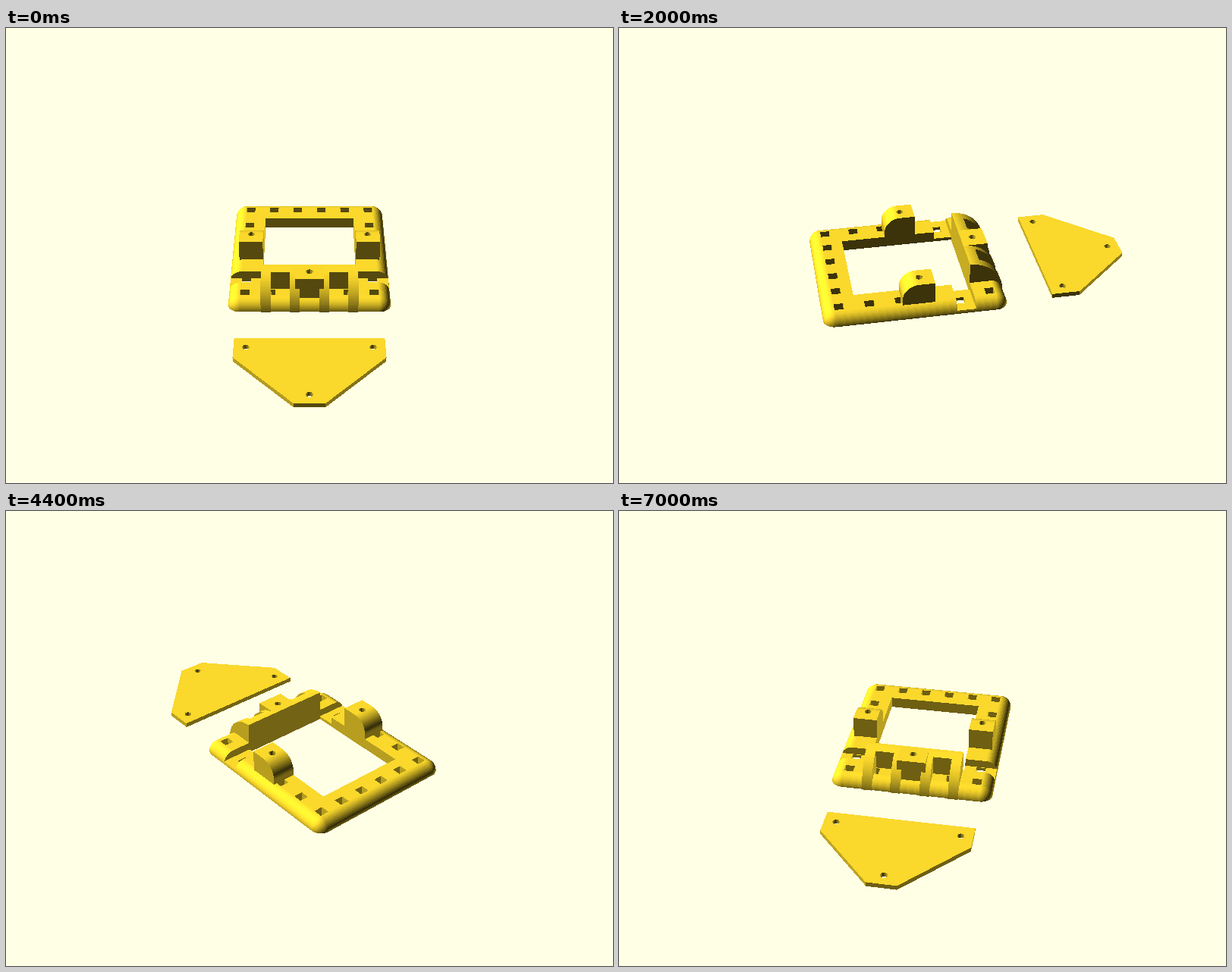
Recreate the animation shown at these times as an HTML page with a canvas. Size 800 px wide and 600 px high, loop 7200 ms.

```html
<!DOCTYPE html>
<html lang="en">
<head>
<meta charset="utf-8">
<title>Turntable</title>
<style>
  html, body { margin: 0; width: 100%; height: 100%; overflow: hidden; background: #ffffe5; }
  canvas { display: block; width: 800px; height: 600px; }
</style>
</head>
<body>
<canvas id="view" width="800" height="600"></canvas>
<script>
const W = 800, H = 600, STEPS = 36, STEP_MS = 200;
const RAD = Math.PI / 180;
const DIST = 500, FOCAL = 300 / Math.tan(11.25 * RAD);
const CT = Math.cos(55 * RAD), ST = Math.sin(55 * RAD);
const PIVOT_Z = 7.2;
const BASE = [249, 215, 44];

// ---- model ----
const HX = 29.3, Y0 = -25.9, Y1 = 42, RIM = 5;      // flat part of the frame and its rounded rim
const WIN_X = 20.3, WIN_Y = 33.1;                   // window
const GAP0 = -16.8, GAP1 = -8.9, GAP_Z = 1.5;       // thin bridge behind the hinge
const TOP = 14.4, PIN = 1.5;
const COLS = [-5, -3, -1, 1, 3, 5].map(k => k * 5.46);
const ROWS = [40, 27.2, 14.4, -11.2, -24];
const PINS = [[25.4, 6], [-25.4, 6], [0, -22], [25.4, -56.5], [-25.4, -56.5], [0, -84.5]];

const faces = [];

function face(...pts) {
  const n = [0, 0, 0];
  pts.forEach((p, i) => {
    const q = pts[(i + 1) % pts.length];
    for (let a = 0; a < 3; a++) {
      const b = (a + 1) % 3, c = (a + 2) % 3;
      n[a] += (p[b] - q[b]) * (p[c] + q[c]);
    }
  });
  const len = Math.hypot(...n);
  if (len > 1e-9) faces.push({ pts, n: n.map(v => v / len) });
}

// Extrudes a convex outline along axis 0, 1 or 2.
function prism(outline, axis, from, to) {
  const at = ([a, b], t) => axis === 0 ? [t, a, b] : axis === 1 ? [a, t, b] : [a, b, t];
  face(...outline.map(p => at(p, from)));
  face(...outline.map(p => at(p, to)));
  outline.forEach((p, i) => {
    const q = outline[(i + 1) % outline.length];
    face(at(p, from), at(q, from), at(q, to), at(p, to));
  });
}

function arc(cx, cy, rx, ry, a0, a1, n) {
  return Array.from({ length: n + 1 }, (_, i) => {
    const a = a0 + (a1 - a0) * i / n;
    return [cx + rx * Math.cos(a), cy + ry * Math.sin(a)];
  });
}

const near = (list, v) => list.some(c => Math.abs(c - v) < 2);

function solid(x, y, z) {
  if (Math.abs(x) > HX || y < Y0 || y > Y1 || z < 0 || z > RIM) return false;
  if (Math.abs(x) < WIN_X && y > GAP0 && y < WIN_Y) return false;
  if (y > GAP0 && y < GAP1 && z > GAP_Z) return false;
  return !(near(COLS, x) && near(ROWS, y));
}

function cuts(list, centres) {
  const all = list.concat(...centres.map(c => [c - 2, c + 2])).sort((a, b) => a - b);
  return all.filter((v, i) => !i || v - all[i - 1] > 1e-6);
}

// Block part of the frame: one face wherever solid meets air.
function blocks() {
  const g = [
    cuts([-HX, -WIN_X, WIN_X, HX], COLS),
    cuts([Y0, GAP0, GAP1, WIN_Y, Y1], ROWS),
    [0, GAP_Z, RIM]
  ];
  const mid = (a, i) => i < 0 || i > g[a].length - 2 ? 1e4 : (g[a][i] + g[a][i + 1]) / 2;
  const full = c => solid(mid(0, c[0]), mid(1, c[1]), mid(2, c[2]));
  for (let a = 0; a < 3; a++) {
    const b = (a + 1) % 3, c = (a + 2) % 3;
    for (let i = 0; i < g[a].length; i++)
      for (let j = 0; j < g[b].length - 1; j++)
        for (let k = 0; k < g[c].length - 1; k++) {
          const lo = [], hi = [];
          lo[a] = i - 1; hi[a] = i;
          lo[b] = hi[b] = j;
          lo[c] = hi[c] = k;
          if (full(lo) === full(hi)) continue;
          const corner = (u, v) => {
            const p = [];
            p[a] = g[a][i]; p[b] = g[b][j + u]; p[c] = g[c][k + v];
            return p;
          };
          face(corner(0, 0), corner(1, 0), corner(1, 1), corner(0, 1));
        }
  }
}

function rim() {
  const Q = Math.PI / 2, N = 12;
  const round = (edge, s) => [[edge, 0], ...arc(edge, 0, s * RIM, RIM, 0, Q, N)];
  prism(round(Y0, -1), 0, -HX, HX);
  prism(round(Y1, 1), 0, -HX, HX);
  for (const s of [-1, 1]) {
    const side = round(s * HX, s);
    prism(side, 1, Y0, GAP0);
    prism(side, 1, GAP1, Y1);
    const low = arc(s * HX, 0, s * RIM, RIM, 0, Math.asin(GAP_Z / RIM), 4);
    prism([[s * HX, 0], ...low, [s * HX, GAP_Z]], 1, GAP0, GAP1);
    for (const [y, t] of [[Y0, -1], [Y1, 1]]) {
      const ball = (i, j) => {
        const a = Q * i / N, b = Q * j / N;
        return [s * HX + s * RIM * Math.cos(a) * Math.cos(b),
                y + t * RIM * Math.sin(a) * Math.cos(b), RIM * Math.sin(b)];
      };
      for (let i = 0; i < N; i++)
        for (let j = 0; j < N; j++)
          face(ball(i, j), ball(i + 1, j), ball(i + 1, j + 1), ball(i, j + 1));
    }
  }
}

function build() {
  blocks();
  rim();
  const Q = Math.PI / 2;
  const rib = [[GAP0, 0], ...arc(GAP0, 0, -TOP, TOP, 0, Q, 24)];
  const wallEnd = Math.acos(4.7 / TOP);
  const wall = [[GAP0, 0], [GAP0 - 4.7, 0], ...arc(GAP0, 0, -TOP, TOP, wallEnd, Q, 8)];
  const ear = [[0, 0], [13.7, 0], ...arc(6.7, TOP - 7, 7, 7, 0, Q, 18), [0, TOP]];
  for (const s of [-1, 1]) {
    prism(rib, 0, s * 4.2, s * 8.3);
    prism(rib, 0, s * 16.2, s * 20.4);
    prism(wall, 0, s * 6, s * 20.4);
    prism(ear, 0, s * WIN_X, s * 30.7);
  }
  prism([[GAP0, 0], [-27.5, 0], [-27.5, TOP], [GAP0, TOP]], 0, -6, 6);
  prism([[-30.4, -50.7], [30.4, -50.7], [30.4, -62.7], [6, -89.5], [-6, -89.5], [-30.4, -62.7]], 2, 0, 2);

  for (const [x, y] of PINS) {
    const top = y < -50 ? 2 : TOP, low = y < -50 ? 0 : TOP - 9;
    const ring = arc(x, y, PIN, PIN, 0, 4 * Q, 20);
    for (let i = 0; i < 20; i++) {
      const [p, q] = [ring[i], ring[i + 1]];
      face([...p, low], [...q, low], [...q, top], [...p, top]);
    }
  }
}

// ---- renderer ----
const ctx = document.getElementById('view').getContext('2d');
const image = ctx.createImageData(W, H);
const pixels = new Uint32Array(image.data.buffer);
const depth = new Float32Array(W * H);
const rgb = (r, g, b) => (255 << 24 | b << 16 | g << 8 | r) >>> 0;
const PAPER = rgb(255, 255, 229);

const inPin = (x, y) => PINS.some(([a, b]) => (x - a) ** 2 + (y - b) ** 2 < PIN * PIN);

function triangle(a, b, c, color, drilled) {
  const area = (b.x - a.x) * (c.y - a.y) - (b.y - a.y) * (c.x - a.x);
  if (Math.abs(area) < 1e-9) return;
  const x0 = Math.max(0, Math.floor(Math.min(a.x, b.x, c.x)));
  const x1 = Math.min(W - 1, Math.ceil(Math.max(a.x, b.x, c.x)));
  const y0 = Math.max(0, Math.floor(Math.min(a.y, b.y, c.y)));
  const y1 = Math.min(H - 1, Math.ceil(Math.max(a.y, b.y, c.y)));
  for (let y = y0; y <= y1; y++)
    for (let x = x0; x <= x1; x++) {
      const px = x + 0.5, py = y + 0.5;
      const u = ((b.x - px) * (c.y - py) - (b.y - py) * (c.x - px)) / area;
      const v = ((c.x - px) * (a.y - py) - (c.y - py) * (a.x - px)) / area;
      const t = 1 - u - v;
      if (u < -1e-7 || v < -1e-7 || t < -1e-7) continue;
      const w = u * a.w + v * b.w + t * c.w, i = y * W + x;
      if (w <= depth[i]) continue;
      if (drilled) {
        const mx = (u * a.w * a.p[0] + v * b.w * b.p[0] + t * c.w * c.p[0]) / w;
        const my = (u * a.w * a.p[1] + v * b.w * b.p[1] + t * c.w * c.p[1]) / w;
        if (inPin(mx, my)) continue;
      }
      depth[i] = w;
      pixels[i] = color;
    }
}

function render(angle) {
  const c = Math.cos(angle), s = Math.sin(angle);
  pixels.fill(PAPER);
  depth.fill(0);
  const project = p => {
    const x = p[0] * c - p[1] * s, y = p[0] * s + p[1] * c, z = p[2] - PIVOT_Z;
    const w = 1 / (DIST + y * ST - z * CT);
    return { x: W / 2 + FOCAL * x * w, y: H / 2 - FOCAL * (y * CT + z * ST) * w, w, p };
  };
  for (const { pts, n } of faces) {
    const nx = n[0] * c - n[1] * s, ny = n[0] * s + n[1] * c;
    // Two opposite lights fixed to the camera, plus ambient.
    const lit = 0.2 + Math.abs(-nx - (ST - CT) * ny + (ST + CT) * n[2]) / Math.sqrt(3);
    const color = rgb(...BASE.map(v => Math.min(255, Math.round(v * lit))));
    const q = pts.map(project), drilled = Math.abs(n[2]) > 0.9;
    for (let i = 2; i < q.length; i++) triangle(q[0], q[i - 1], q[i], color, drilled);
  }
  ctx.putImageData(image, 0, 0);
}

build();
const start = performance.now();
let shown = -1;

function tick() {
  const step = Math.floor((performance.now() - start) / STEP_MS) % STEPS;
  if (step !== shown) {
    shown = step;
    render(step * 2 * Math.PI / STEPS);
  }
  requestAnimationFrame(tick);
}
tick();
</script>
</body>
</html>
```
